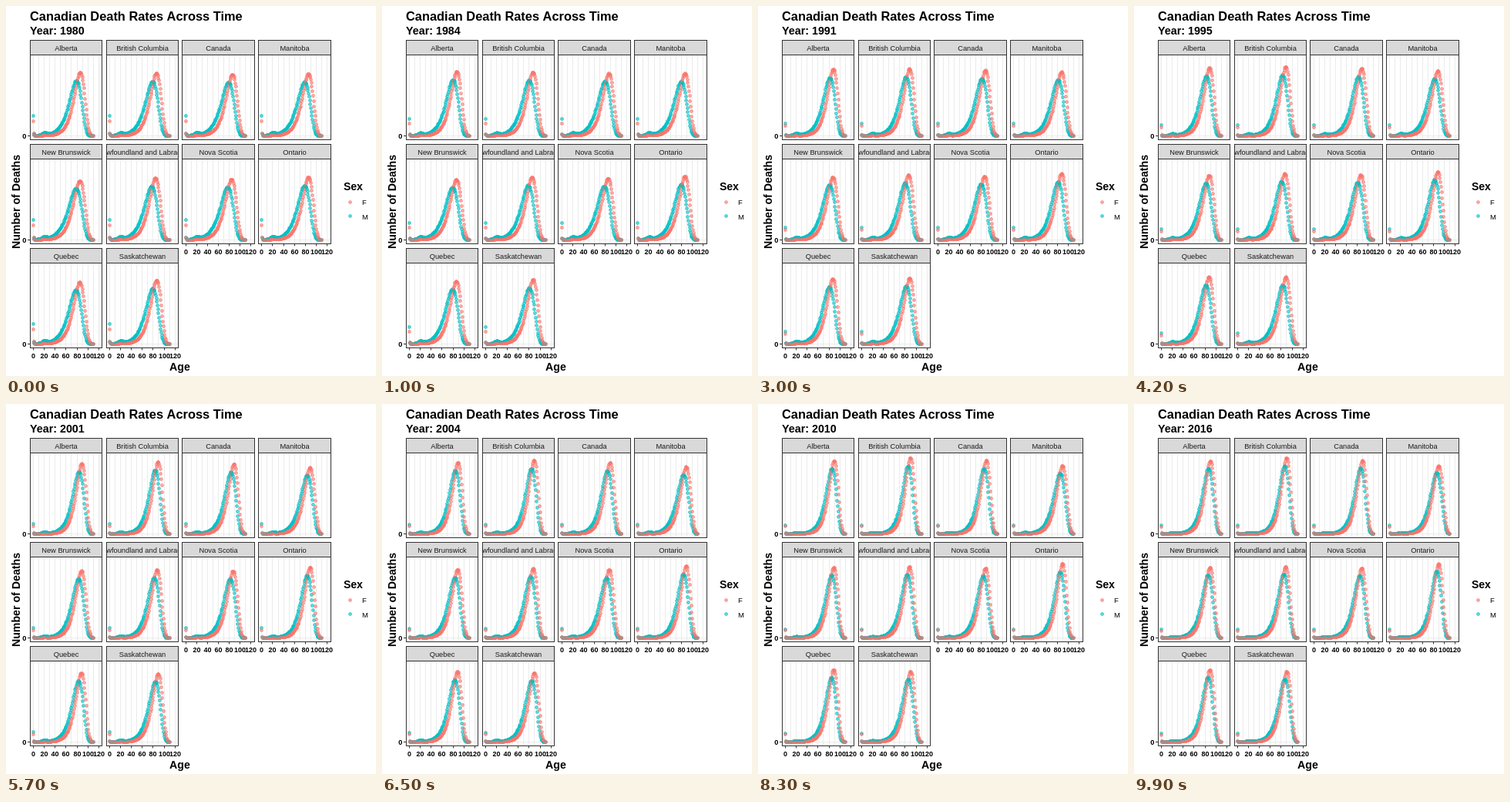
Animation, 480 px wide and 480 px high, one loop 10 s. Source, as an HTML page with a canvas:

```html
<!DOCTYPE html>
<html lang="en">
<head>
<meta charset="utf-8">
<title>Canadian Death Rates Across Time</title>
<style>
  html, body { margin: 0; width: 100%; height: 100%; overflow: hidden; background: #fff; }
  canvas { display: block; }
</style>
</head>
<body>
<canvas id="stage" width="480" height="480"></canvas>
<script>
const ctx = document.getElementById('stage').getContext('2d');
const FONT = '"Liberation Sans", Arial, sans-serif';
const RED = '#F8766D', TEAL = '#00BFC4';
const STEP = 100, STEPS = 100;

// name, shift of the peak age, first and last height of the female peak
const panels = [
  ['Alberta', 0.5, 82, 94.5],
  ['British Columbia', 0.5, 81, 98.5],
  ['Canada', 0, 79.5, 95],
  ['Manitoba', 0, 80, 88],
  ['New Brunswick', -0.2, 76.5, 91],
  ['Newfoundland and Labrador', -1.2, 80, 92],
  ['Nova Scotia', -1.5, 78.5, 90],
  ['Ontario', 0, 81, 96],
  ['Quebec', -0.4, 80, 93.5],
  ['Saskatchewan', 0.8, 82.5, 91]
].map(([name, shift, first, last], i) => {
  const col = i % 4, row = Math.floor(i / 4);
  return {
    name, shift, first, last, col,
    left: snap(31.4 + 98.75 * col),
    right: 124.5 + 99 * col,
    zeroX: 35.4 + 98.8 * col,
    top: 44.5 + 135 * row,
    zeroY: 168.5 + 135 * row,
    hasAxis: i > 5
  };
});

function snap(v) {
  return Math.floor(v) + 0.5;
}

function mix(a, b, t) {
  return a + (b - a) * t;
}

function ageX(p, age) {
  return snap(p.zeroX + age * 0.708);
}

function text(str, x, y, size, { bold = false, align = 'left', color = '#000' } = {}) {
  ctx.font = `${bold ? 'bold ' : ''}${size}px ${FONT}`;
  ctx.textAlign = align;
  ctx.fillStyle = color;
  ctx.fillText(str, x, y);
}

function line(x1, y1, x2, y2, color) {
  ctx.strokeStyle = color;
  ctx.beginPath();
  ctx.moveTo(x1, y1);
  ctx.lineTo(x2, y2);
  ctx.stroke();
}

function dot(x, y, color) {
  ctx.globalAlpha = 0.6;
  ctx.fillStyle = ctx.strokeStyle = color;
  ctx.beginPath();
  ctx.arc(x, y, 2, 0, 2 * Math.PI);
  ctx.fill();
  ctx.stroke();
  ctx.globalAlpha = 1;
}

// Infant deaths, then a Gompertz curve plus childhood and young adult deaths
function deathCurve(p, year, male) {
  const t = (year - 1980) / 36;
  const fade = Math.exp((1980 - year) / 11);
  const growth = Math.min(1, (year - 1980) / 28) ** 1.2;
  const peak = mix(p.first, p.last, growth) * (male ? mix(0.87, 0.895, t) : 1);
  const mode = p.shift + (male ? 79 + 7.4 * t ** 0.85 : 86 + 4 * t ** 0.6);
  const rate = 0.00126 * peak;
  const infant = male ? mix(10.5, 26, fade) : mix(9, 18.7, fade);
  const hump = male ? mix(2.9, 0.9, t) : 0.4;
  return age => {
    if (age === 0) return infant;
    const u = rate * (age - mode);
    return peak * Math.exp(1 + u - Math.exp(u))
      + hump * Math.exp(-(((age - 21) / 6) ** 2))
      + (0.5 + 2 * fade) * Math.exp(1 - age);
  };
}

function drawPoints(p, year) {
  const men = deathCurve(p, year, true);
  const women = deathCurve(p, year, false);
  for (let age = 0; age <= 110; age++) {
    const x = ageX(p, age);
    dot(x, snap(p.zeroY - men(age)), TEAL);
    dot(x, snap(p.zeroY - women(age)), RED);
  }
}

function drawPanel(p, year) {
  const { left, right, top, zeroY } = p;
  const width = right - left, split = top + 19, bottom = top + 129;

  for (let age = 0; age <= 120; age += 10) {
    line(ageX(p, age), split, ageX(p, age), bottom, '#EBEBEB');
  }
  line(left, zeroY, right, zeroY, '#EBEBEB');
  drawPoints(p, year);

  ctx.fillStyle = '#D9D9D9';
  ctx.fillRect(left, top, width, 19);
  ctx.save();
  ctx.beginPath();
  ctx.rect(left, top, width, 19);
  ctx.clip();
  text(p.name, (left + right) / 2, top + 13.5, 9.3, { align: 'center', color: '#1A1A1A' });
  ctx.restore();

  ctx.strokeStyle = '#333';
  ctx.strokeRect(left, top, width, 19);
  ctx.strokeRect(left, split, width, 110);

  if (p.col === 0) {
    line(28, zeroY, left, zeroY, '#333');
    text('0', 26.5, zeroY + 3.5, 9.3, { bold: true, align: 'right' });
  }
  if (p.hasAxis) {
    for (let age = 0; age <= 120; age += 20) {
      const x = ageX(p, age);
      line(x, bottom, x, bottom + 3, '#333');
      text(age, x, bottom + 13.5, 9, { bold: true, align: 'center' });
    }
  }
}

function draw(step) {
  const year = 1980 + 36 * step / (STEPS - 1);
  ctx.lineWidth = 1;
  ctx.fillStyle = '#fff';
  ctx.fillRect(0, 0, 480, 480);

  text('Canadian Death Rates Across Time', 31, 19, 16.4, { bold: true });
  text('Year: ' + Math.round(year), 31, 37, 14.3, { bold: true });
  for (const p of panels) drawPanel(p, year);

  text('Age', 225.5, 473, 14.2, { bold: true, align: 'center' });
  ctx.save();
  ctx.translate(17.5, 254);
  ctx.rotate(-Math.PI / 2);
  text('Number of Deaths', 0, 0, 14.2, { bold: true, align: 'center' });
  ctx.restore();

  text('Sex', 438, 239, 14, { bold: true });
  dot(446.5, 254.5, RED);
  dot(446.5, 272.5, TEAL);
  text('F', 462, 258, 9.3);
  text('M', 462, 277, 9.3);
}

const start = performance.now();
let shown = -1;
function tick() {
  const step = Math.floor((performance.now() - start) / STEP) % STEPS;
  if (step !== shown) draw(shown = step);
  requestAnimationFrame(tick);
}
tick();
</script>
</body>
</html>
```
